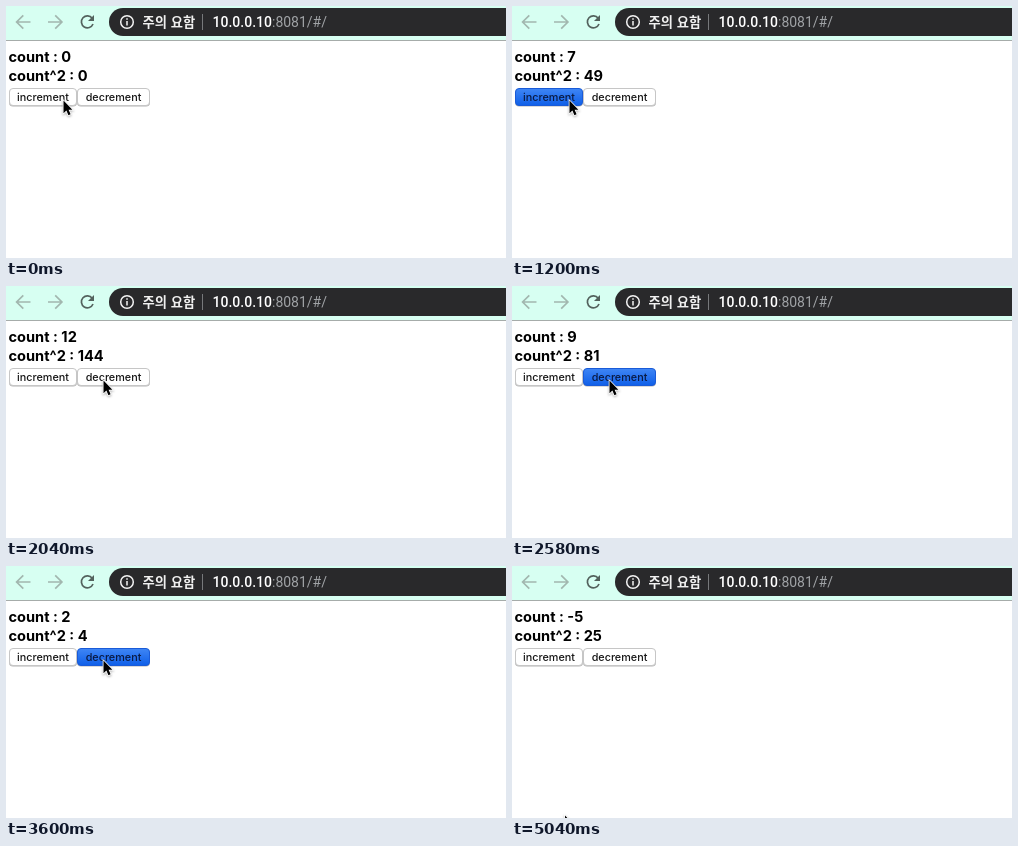
Write an HTML page that moves like this. It is 500 by 252 pixels and loops after 5100 ms.

```html
<!DOCTYPE html>
<html lang="ko">
<head>
<meta charset="utf-8">
<title>Counter</title>
<style>
  html, body { margin: 0; width: 100%; height: 100%; overflow: hidden; background: #fff; }
  svg { display: block; width: 500px; height: 252px; }
  text { white-space: pre; }
  .count { font: 700 14.6px Inter, "Open Sans", sans-serif; fill: #000; }
  .label { font: 500 10.8px Inter, "Liberation Sans", sans-serif; fill: #161616; text-anchor: middle; }
  .notice { font: 700 13.3px "Noto Sans CJK KR", "Noto Sans CJK", sans-serif; fill: #f0f0f0; }
  .url { font: 500 14px Roboto, sans-serif; fill: #fff; }
  .path { font-weight: 400; fill: #a0a3a6; }
  .edge { fill: #b4b4b4; }
  .face { fill: #fff; stroke: #c6c6c6; }
  .down .face { fill: url(#blue); stroke: #1a5bd8; }
  .down .label { fill: #0a1a42; }
  .icon { fill: none; stroke-width: 1.7; }
  #cursor { filter: drop-shadow(0 1px 1px rgba(0, 0, 0, .3)); }
</style>
</head>
<body>
<svg viewBox="0 0 500 252">
  <defs>
    <linearGradient id="blue" x1="0" y1="0" x2="0" y2="1">
      <stop offset="0" stop-color="#3f86f5"/>
      <stop offset="1" stop-color="#0f5fe8"/>
    </linearGradient>
  </defs>
  <rect width="500" height="252" fill="#fff"/>
  <rect width="500" height="34" fill="#d7fff2"/>
  <rect y="34" width="500" height="1" fill="#a6acaa"/>

  <g class="icon" stroke="#a2b7af">
    <path d="M24.5 16H11M17.3 9.3L10.6 16L17.3 22.7"/>
    <path d="M42 16H55.5M49.2 9.3L55.9 16L49.2 22.7"/>
  </g>
  <path class="icon" stroke="#53625d" d="M86.2 12.2A6 6 0 1 0 87 18"/>
  <path fill="#53625d" d="M88 9V15H82Z"/>

  <rect x="103" y="2" width="420" height="28" rx="14" fill="#29292b"/>
  <circle cx="121" cy="16" r="6.3" fill="none" stroke="#f4f4f4" stroke-width="1.5"/>
  <path d="M121 15V19.5M121 12.2V13.8" stroke="#f4f4f4" stroke-width="1.5"/>
  <text class="notice" x="136.5" y="20.7">주의 요함</text>
  <rect x="196" y="8" width="1" height="16" fill="#77797b"/>
  <text class="url" x="206.5" y="21">10.0.0.10<tspan class="path">:8081/#/</tspan></text>

  <text class="count" id="count" x="2.5" y="56"></text>
  <text class="count" id="square" x="2.5" y="75"></text>

  <g id="inc">
    <rect class="edge" x="3" y="83" width="68" height="17.5" rx="4"/>
    <rect class="face" x="3.5" y="82.5" width="67" height="17" rx="3.5"/>
    <text class="label" x="37" y="95">increment</text>
  </g>
  <g id="dec">
    <rect class="edge" x="71" y="83" width="73" height="17.5" rx="4"/>
    <rect class="face" x="71.5" y="82.5" width="72" height="17" rx="3.5"/>
    <text class="label" x="107.5" y="95">decrement</text>
  </g>

  <path id="cursor" d="M.5 .6V13.2L3.4 10.6L5.4 15.3L7.6 14.3L5.6 9.7H9.4Z"
    fill="#000" stroke="#fff" stroke-width="1.6" paint-order="stroke"/>
</svg>
<script>
  const LOOP = 5100, STEP = 60;
  const $ = id => document.getElementById(id);
  const clamp = v => Math.max(0, Math.min(1, v));
  const smooth = v => v * v * (3 - 2 * v);

  // Clicks at a steady pace: how many are finished, and whether one is held.
  function clicks(t, start, period, hold, total) {
    if (t < start) return { done: 0, down: false };
    const n = Math.floor((t - start) / period);
    if (n >= total) return { done: total, down: false };
    const down = (t - start) % period < hold;
    return { done: down ? n : n + 1, down };
  }

  function cursorAt(t) {
    const across = smooth(clamp((t - 1740) / 300));
    const leave = clamp((t - 4800) / 240);
    return [
      57 + 40 * across - 44.5 * leave,
      94 + 2.5 * Math.sin(Math.PI * across) + 155 * leave ** 1.6
    ];
  }

  function draw(t) {
    const first = clicks(t, 180, 300, 120, 1);
    const up = clicks(t, 480, 120, 60, 11);
    const back = clicks(t, 2100, 146, 75, 17);
    const n = first.done + up.done - back.done;
    $("count").textContent = `count : ${n}`;
    $("square").textContent = `count^2 : ${n * n}`;
    $("inc").classList.toggle("down", first.down || up.down);
    $("dec").classList.toggle("down", back.down);
    $("cursor").setAttribute("transform", `translate(${cursorAt(t)})`);
  }

  function tick() {
    const t = performance.now() % LOOP;
    draw(Math.floor(t / STEP) * STEP);
    requestAnimationFrame(tick);
  }
  tick();
</script>
</body>
</html>
```
